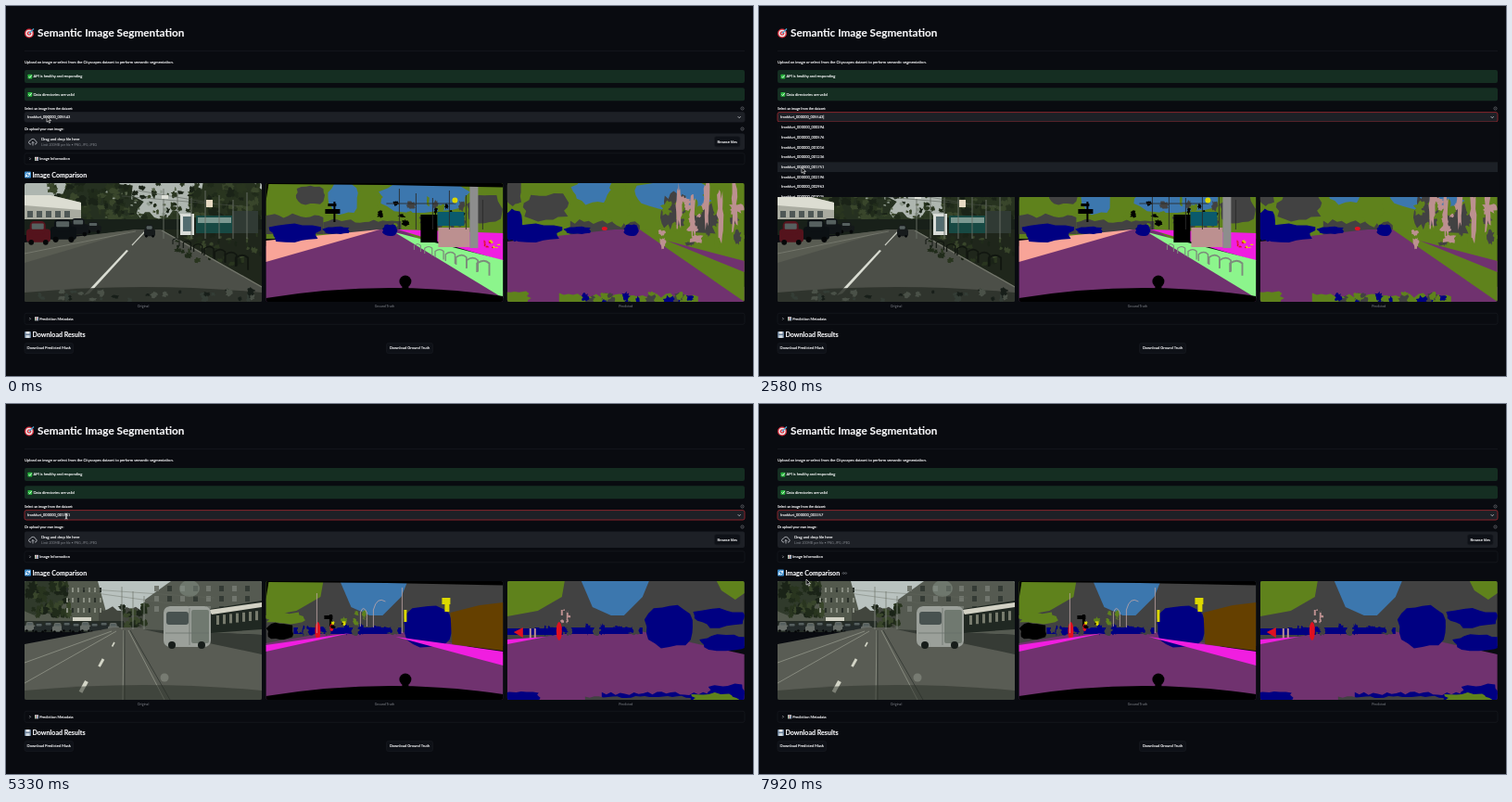
An HTML page for the animation above (8 s loop, 806x399 px).

```html
<!DOCTYPE html>
<html lang="en">
<head>
<meta charset="utf-8">
<title>Semantic Image Segmentation</title>
<style>
  html, body { margin: 0; width: 100%; height: 100%; overflow: hidden; background: #090b10; }
  svg { display: block; width: 100vw; height: 100vh; }
  text { font-family: Lato, "Open Sans", sans-serif; color: #f8f8fa; fill: currentColor;
    stroke: currentColor; stroke-width: .12; white-space: pre; }
  .dim { color: #82868d; stroke-width: 0; }
  .edge { stroke: #171a20; stroke-width: .7; }
</style>
</head>
<body>
<svg id="stage" viewBox="0 0 806 399"></svg>
<script>
const LOOP = 8000, STEP = 1000 / 12, ROW = 10.68, PANEL = 260.4;
const C = {
  road: '#70326f', veg: '#5f821c', sky: '#3c77ae', wall: '#424242', car: '#000082',
  walk: '#f01ee0', grass: '#8cf58c', park: '#f8a498', pole: '#bc9090', person: '#e01020',
  sign: '#dcd800', fence: '#654000', black: '#000', teal: '#0a5a6c', grey: '#8d8d8d'
};
const LEAVES = ['#1a2317', '#29351f', '#39462b', '#202b1a'];

// Markup helpers
const poly = (fill, points) => `<polygon fill="${fill}" points="${points}"/>`;
const rect = (fill, x, y, w, h, more = '') =>
  `<rect fill="${fill}" x="${x}" y="${y}" width="${w}" height="${h}" ${more}/>`;
const blob = (fill, x, y, rx, ry = rx, more = '') =>
  `<ellipse fill="${fill}" cx="${x}" cy="${y}" rx="${rx}" ry="${ry}" ${more}/>`;
const line = (color, width, d, more = '') =>
  `<path fill="none" stroke="${color}" stroke-width="${width}" d="${d}" ${more}/>`;
const text = (x, y, size, str, more = '') =>
  `<text x="${x}" y="${y + size * .35}" font-size="${size}" ${more}>${str}</text>`;
const group = (id, body, more = '') => `<g id="${id}" ${more}>${body}</g>`;
const repeat = (n, f) => Array.from({ length: n }, (_, i) => f(i)).join('');

function random(seed) {
  let s = (Math.abs(Math.round(seed)) * 7919 + 104729) % 2147483647;
  return () => (s = s * 16807 % 2147483647) / 2147483647;
}

// Rounded box with an uneven outline
function patch(fill, x, y, rx, ry, rough = .12) {
  const rnd = random(x * 31 + y * 17 + rx);
  return poly(fill, Array.from({ length: 20 }, (_, i) => {
    const c = Math.cos(i * Math.PI / 10), s = Math.sin(i * Math.PI / 10);
    const r = (Math.abs(c) ** 3 + Math.abs(s) ** 3) ** (-1 / 3) * (1 + rough * (rnd() * 2 - 1));
    return `${(x + rx * r * c).toFixed(1)},${(y + ry * r * s).toFixed(1)}`;
  }).join(' '));
}

// Uneven spots over a box
function scatter(n, x, y, w, h, size, colors) {
  const rnd = random(n * 53 + x + y * 7);
  return repeat(n, i => patch(colors[i % colors.length], x + rnd() * w, y + rnd() * h,
    size * (.4 + rnd()), size * (.4 + rnd()), .35));
}

// Band with a ragged upper edge
function ridge(fill, x, y, w, h, rough) {
  const rnd = random(x + y * 11 + w), n = Math.ceil(w / 5);
  return `<path fill="${fill}" d="M${x} ${y + h}${repeat(n + 1, i =>
    `L${x + w * i / n} ${(y + rough * (rnd() * 2 - 1)).toFixed(1)}`)}V${y + h}Z"/>`;
}

// Strip of ground that narrows toward the horizon
const wedge = (fill, vx, vy, x, top, bottom) => poly(fill, `${vx},${vy} ${x},${top} ${x},${bottom}`);
const ground = (fill, vx, left, right) =>
  poly(fill, `0,${left} ${vx - 14},50 ${vx + 14},50 256,${right} 256,128 0,128`);
const racks = (color, y) => repeat(7, i => {
  const s = 1 + i * .15;
  return line(color, s, `M${160 + i * 11.3} ${y + i * 4}v${-5 * s}q${4 * s} ${-3 * s} ${7 * s} 0v${7 * s}`);
});
const poles = (n, color, x, gap, h) => repeat(n, i => line(color, .9, `M${x + i * gap} ${6 + i * 5 % 13}V${h}`));

const egoMask = poly(C.black, '0,0 256,0 256,4.5 130,2 3,1 0,20') +
  `<path d="M0 124Q128 103 256 122V128H0Z"/>` + blob(C.black, 150.5, 106, 6.5) + rect(C.black, 147, 108, 7, 6);

const parkedCar = (x, y, w, h, fill) =>
  rect(fill, x, y + h * .35, w, h * .6, `rx="${h * .15}"`) +
  rect(fill, x + w * .14, y, w * .66, h * .6, `rx="${h * .2}"`) +
  rect('#56605f', x + w * .22, y + h * .1, w * .5, h * .26, 'rx="1"') +
  blob('#050708', x + w * .2, y + h * .95, w * .11) + blob('#050708', x + w * .8, y + h * .95, w * .11);
const hood = `<path fill="#2b3029" d="M0 118Q128 106 256 118V128H0Z" opacity=".85"/>`;

function avenuePhoto() {
  return rect('#aeb6b0', 0, 0, 256, 55) +
    patch('#253020', 82, 20, 40, 26, .2) + ridge('#2c3924', 95, 34, 80, 20, 5) +
    patch('#27321f', 222, 24, 40, 32, .15) +
    scatter(75, 28, 0, 82, 40, 4, LEAVES) + scatter(85, 178, 0, 78, 46, 4, LEAVES) +
    scatter(45, 105, 0, 75, 48, 2.4, LEAVES) + scatter(18, 85, 5, 90, 32, 1.5, ['#8e998d', '#56634b']) +
    poly('#a9aba0', '0,13 28,13 61,21 61,44 0,48') + poly('#dcddd2', '0,13 28,13 61,21 61,29 0,24') +
    repeat(5, i => rect('#4f5856', 3 + i * 10, 30, 6, 7)) + rect('#182019', 0, 39, 256, 17) +
    ground('#4c4f48', 133, 66, 108) + wedge('#595c52', 122, 50, 0, 64, 86) +
    wedge('#1f261b', 148, 50, 256, 50, 112) +
    scatter(40, 165, 52, 90, 35, 2.5, LEAVES) +
    line('#73766b', 1.3, 'M148 51L256 112') + line('#85887c', .6, 'M120 52L0 76') +
    poly('#d9dcd2', '110,72 112,73 70,119 64,121') + line('#c8cbc1', 1.2, 'M130 52L116 67') +
    parkedCar(66, 42, 17, 11, '#15191a') + parkedCar(48, 38, 21, 18, '#111518') +
    parkedCar(28, 39, 28, 23, '#0c1114') + parkedCar(2, 41, 26, 24, '#54131c') +
    parkedCar(129, 45, 12, 13, '#171b1c') +
    rect('#174943', 185, 35, 40, 19) + rect('#7c9991', 187, 37, 36, 6) + rect('#303a34', 224, 30, 28, 24) +
    rect('#d9dcd8', 168, 33, 15, 23) + rect('#536c70', 171, 36, 9, 16) +
    poles(7, '#6d736a', 150, 15, 60) + line('#4e544d', .5, 'M105 14L235 25M122 8L205 22') +
    rect('#dde0d8', 148, 13, 7, 4) + rect('#e6d9c2', 196, 18, 7, 8) + racks('#111610', 66) +
    hood + scatter(30, 10, 116, 236, 11, 3, ['#4a5148', '#171e19', '#343d36']);
}

const avenueCars = patch(C.car, 31, 54, 28, 9, .2) + patch(C.car, 76, 51, 14, 4) + patch(C.car, 134, 51, 8, 6);

function avenueTruth() {
  return rect(C.veg, 0, 0, 256, 60) +
    patch(C.sky, 84, 16, 16, 17) + patch(C.sky, 171, 15, 47, 16, .08) + patch(C.veg, 112, 24, 13, 22) +
    patch(C.wall, 48, 13, 15, 10) + ridge(C.wall, 0, 35, 62, 20, 3) + ridge(C.wall, 62, 41, 84, 14, 2) +
    patch(C.wall, 236, 28, 18, 15) + scatter(26, 112, 20, 108, 26, 3.5, [C.veg, C.wall, C.black]) +
    ground(C.road, 133, 68, 116) + wedge(C.park, 123, 50, 0, 62, 85) +
    wedge(C.walk, 142, 50, 256, 54, 84) + wedge(C.grass, 139, 53, 256, 83, 124) + avenueCars +
    rect(C.pole, 186, 48, 34, 21) + rect(C.teal, 185, 31, 29, 15) +
    rect(C.black, 167, 34, 18, 30) + rect(C.grey, 220, 2, 9, 68) +
    rect(C.black, 64, 28, 16, 5) + rect(C.black, 67, 22, 9, 3) + line(C.black, 2, 'M74 20V42') +
    poles(6, '#2c2c2c', 144, 18, 50) + line('#2c2c2c', .9, 'M130 22H205') +
    blob(C.sign, 204, 18.5, 3) + scatter(12, 228, 58, 26, 12, 1.2, [C.person, C.sign]) +
    racks('#7c8b7b', 72) + egoMask;
}

function avenueResult() {
  return rect(C.veg, 0, 0, 256, 60) +
    patch(C.wall, 6, 10, 9, 14, .2) + patch(C.wall, 42, 26, 24, 14, .2) + ridge(C.wall, 68, 42, 75, 14, 4) +
    patch(C.sky, 92, 9, 22, 14, .2) + patch(C.sky, 175, 13, 40, 16, .2) + patch(C.veg, 118, 24, 13, 20, .25) +
    patch(C.wall, 176, 30, 9, 18, .3) + patch(C.wall, 213, 46, 10, 24, .3) +
    ground(C.road, 130, 63, 112) + patch(C.car, 8, 45, 9, 17) + avenueCars +
    wedge(C.veg, 143, 50, 256, 56, 128) + wedge(C.road, 172, 62, 256, 84, 96) +
    scatter(28, 160, 18, 90, 50, 5, [C.pole, C.veg, C.wall]) +
    repeat(5, i => patch(C.pole, 185 + i * 15, 24 + i % 2 * 10, 3, 24, .4)) +
    blob(C.person, 105, 49, 3, 2) + patch(C.veg, 8, 124, 16, 7, .2) + ridge(C.veg, 56, 121, 150, 7, 3) +
    scatter(24, 50, 121, 155, 7, 4, [C.wall, C.car, C.veg]);
}

function streetPhoto() {
  return rect('#b9c2bf', 0, 0, 256, 54) +
    poly('#53594d', '0,0 79,0 92,48 0,52') + patch('#303a2b', 20, 14, 26, 20, .2) +
    ridge('#42463e', 80, 30, 50, 24, 4) + poly('#555a51', '126,53 130,20 158,0 256,0 256,58') +
    scatter(48, 0, 0, 50, 38, 4, LEAVES) + scatter(24, 105, 25, 25, 24, 3, LEAVES) +
    repeat(21, i => rect(i % 3 ? '#8a8f83' : '#292f29', 45 + (i % 7) * 6, 7 + Math.floor(i / 7) * 11, 2, 5)) +
    repeat(24, i => rect(i % 2 ? '#343b35' : '#71766e', 140 + (i % 8) * 14, 5 + Math.floor(i / 8) * 11, 5, 6)) +
    rect('#252c26', 0, 43, 107, 12) + rect('#d2d2c5', 52, 39, 20, 4) +
    repeat(10, i => parkedCar(i * 10, 44 + i % 2, 12, 10, i % 3 ? '#242b2b' : '#686e69')) +
    ground('#595c54', 110, 68, 77) + wedge('#363b35', 128, 52, 256, 58, 79) +
    line('#92968a', .8, 'M107 53L106 128M112 53L151 128M99 54L0 110M94 54L0 88') +
    line('#383d37', 1, 'M108 53L108 128M114 53L157 128') +
    repeat(3, i => {
      const s = 1 + i * .8;
      return line('#d3d5c7', 1.6 * s, `M${97 - i * 9 - i * i * 3} ${66 + i * 15 + i * i * 3}l${-2.5 * s} ${4.5 * s}`);
    }) +
    poly('#202822', '200,30 256,21 256,52 201,56') + poly('#d2d1c4', '199,31 256,23 256,28 202,36') +
    repeat(7, i => rect('#777b6d', 207 + i * 7, 37 - i * .8, 3, 10)) +
    rect('#9ba09a', 150, 27, 51, 44, 'rx="7"') + rect('#485250', 153, 33, 24, 14, 'rx="3"') +
    rect('#707970', 180, 31, 19, 36, 'rx="2"') + line('#656e68', .7, 'M178 29V69M152 56H199') +
    blob('#171d1a', 159, 69, 4) + blob('#171d1a', 191, 69, 4) +
    blob('#8d998f', 178, 8, 11, 9, 'opacity=".45"') +
    poles(3, '#81867d', 105, 12, 52) + line('#62675f', .4, 'M70 12L178 27M58 8L205 18') +
    `<g opacity=".6">${hood}</g>` + blob('#777b72', 151, 104, 4.5);
}

function streetLabels(rough) {
  return rect(C.wall, 0, 0, 256, 70) + poly(C.veg, '0,0 62,0 59,17 33,32 0,38') +
    poly(C.sky, '80,0 153,0 146,17 126,37 112,37 92,28') +
    ground(C.road, 112, 67, 79) + rect(C.car, 30, 50, 116, 7) + scatter(18, 31, 50, 114, 5, 4, [C.car, C.car, C.wall]) +
    patch(C.car, 175, 49, 26, 22, rough) + blob(C.person, 56, 54, 3, 10);
}

function streetTruth() {
  return streetLabels(.04) + patch(C.veg, 20, 40, 20, 6, .2) +
    scatter(12, 73, 34, 43, 12, 3, [C.wall, C.veg]) + patch(C.black, 15, 54, 14, 9) +
    wedge(C.walk, 91, 56, 0, 69, 76) + wedge(C.walk, 140, 60, 256, 76, 91) +
    poly(C.fence, '199,34 231,26 256,23 256,75 201,68') +
    rect(C.sign, 190, 18, 9, 7) + rect(C.sign, 193, 25, 5, 8) + rect(C.sign, 149, 31, 3, 13) +
    line('#c2a8a8', .8, 'M55 13V56M147 7V56M102 49V34Q105 25 109 34V49M116 50V31Q120 16 129 22') +
    rect(C.black, 63, 37, 9, 4) + line(C.black, 3, 'M70 36V49') + blob(C.person, 71, 50, 2, 4) +
    scatter(8, 62, 38, 23, 12, 1.5, [C.black, C.sign, C.wall]) + egoMask;
}

function streetResult() {
  return streetLabels(.08) + poly(C.veg, '226,0 256,0 256,13 246,20 231,10') +
    rect(C.car, 0, 51, 60, 7) + patch(C.car, 229, 40, 26, 9, .25) + patch(C.car, 236, 66, 26, 8, .2) +
    blob(C.person, 56, 54, 3, 9) + wedge(C.person, 7, 55, 17, 50, 61) +
    line(C.pole, 2, 'M25 51V63M30 51V61M59 31V37M65 32V44') + scatter(7, 57, 30, 12, 14, 1.5, [C.pole, C.wall]) +
    wedge(C.walk, 42, 60, 0, 63, 68) + patch(C.car, 15, 124, 19, 5, .2) +
    ridge(C.car, 102, 121, 154, 7, 2) + patch(C.car, 238, 120, 20, 8, .2) +
    ridge(C.wall, 84, 125, 114, 3, 1.5) + patch(C.veg, 224, 126, 24, 5, .2);
}

// Small pictographs
const chart = (x, y) => rect('#d7dde0', x, y - 2, 4, 4) +
  ['#44a35c', '#d14848', '#397ebd'].map((c, i) => rect(c, x + .5 + i * 1.1, y - i % 2 - .5, .8, 2 + i % 2)).join('');
const tick = y => rect('#26b43b', 23.5, y - 2.3, 4.7, 4.7, 'rx=".6"') +
  line('#fff', .8, `M24.5 ${y}l1.2 1.3 2 -2.7`);
const target = repeat(4, i => blob(i % 2 ? '#eee' : '#d8303e', 25, 29.5, 5 - i * 1.35)) +
  line('#4aa4cf', 1.2, 'M25 29.5L30 24.5');
const refresh = rect('#3989c9', 20, 178.5, 7, 7, 'rx="1"') +
  line('#fff', .9, 'M21.4 181.5q2 -2.6 4.2 -.3m0 -1.5v1.6h-1.6M25.6 182.6q-2 2.6 -4.2 .3m0 1.5v-1.6h1.6');
const floppy = rect('#657a92', 20, 351, 7, 7, 'rx=".7"') + rect('#e3e7ea', 21.5, 351, 4, 2.6) +
  rect('#cfd9e0', 21.4, 355, 4.2, 3);
const help = y => `<circle cx="794.5" cy="${y}" r="1.6" fill="none" stroke="#92959d" stroke-width=".5"/>` +
  text(794.5, y, 2.4, '?', 'text-anchor="middle" class="dim"');

// Page parts
const bar = (fill, y, h, more = '') => rect(fill, 20, y, 777, h, 'rx="2" ' + more);
const expander = (y, label) => bar('none', y - 6, 12, 'class="edge"') +
  line('#d9dbe0', .6, `M25.3 ${y - 1.2}l1.2 1.2 -1.2 1.2`) + chart(31, y) + text(36.2, y, 4.08, label);
const button = (x, y, w, label) => rect('#0e1117', x, y - 5.5, w, 11, 'rx="2" class="edge"') +
  text(x + w / 2, y, 4.1, label, 'text-anchor="middle"');
const success = (y, label) => bar('#152e22', y - 7, 14) + tick(y) + text(29.5, y, 4.08, label);
const heading = (y, label) => text(28.5, y, 7.1, label, 'font-weight="700"');
const panels = (id, views) => group(id, views.map((draw, i) =>
  `<g transform="translate(${20 + i * PANEL} 191)" clip-path="url(#frame)">${draw()}</g>`).join(''));
const frames = '294 576 1016 1236 1751 2196 2963 3025 3357 3920 4617 5543'.split(' ')
  .map(n => 'frankfurt_000000_' + n.padStart(6, '0'));

const stage = document.getElementById('stage');
stage.innerHTML = `<defs><clipPath id="frame"><rect width="256" height="128" rx="2"/></clipPath>
  <clipPath id="menuClip"><rect x="19" y="125" width="779" height="81"/></clipPath></defs>` +
  rect('#090b10', 0, 0, 806, 399) + target +
  text(34, 29, 11.75, 'Semantic Image Segmentation', 'font-weight="700"') + line('#171a20', .7, 'M20 48.5H797') +
  text(20, 61, 4.08, 'Upload an image or select from the Cityscapes dataset to perform semantic segmentation.') +
  success(76, 'API is healthy and responding') + success(95.3, 'Data directories are valid') +
  text(20, 110.3, 3.58, 'Select an image from the dataset:') + help(110.5) +
  text(20, 132.5, 3.58, 'Or upload your own image:') + help(132.5) + bar('#1d2026', 137.5, 17.5) +
  line('#c3c6cc', .8, 'M27 149h-1a2 2 0 0 1 .5 -3.9a2.7 2.7 0 0 1 5.2 .3a1.9 1.9 0 0 1 .3 3.6h-1M29 150.5v-4m-1.4 1.4l1.4 -1.4 1.4 1.4') +
  text(38, 143.2, 4.1, 'Drag and drop file here') +
  text(38, 149.5, 3.5, 'Limit 200MB per file • PNG, JPG, JPEG', 'class="dim"') +
  button(764.5, 146.3, 27.5, 'Browse files') + expander(164.8, 'Image Information') +
  group('busy', line('#b6b9bf', .6, 'M22.6 176.2a1.6 1.6 0 0 1 0 3') +
    text(27, 177.8, 4.08, 'Performing Segmentation...') + line('#d9dbe0', .8, 'M785 0l1.5 1.5M797 .5h3')) +
  group('results', refresh + heading(182.2, 'Image Comparison') +
    group('anchor', repeat(2, i => blob('none', 91.2 + i * 2.4, 182.5, 1.1, .8, 'stroke="#8d9097" stroke-width=".5"'))) +
    panels('avenue', [avenuePhoto, avenueTruth, avenueResult]) +
    panels('street', [streetPhoto, streetTruth, streetResult]) +
    ['Original', 'Ground Truth', 'Predicted'].map((s, i) =>
      text(148 + i * PANEL, 324, 3.65, s, 'text-anchor="middle" class="dim"')).join('') +
    expander(337.3, 'Prediction Metadata') + floppy + heading(354.5, 'Download Results') +
    button(20, 369, 52.5, 'Download Predicted Mask') + button(410.5, 369, 50, 'Download Ground Truth')) +
  bar('#1d2026', 114.6, 10.4, 'id="field" stroke-width=".8"') +
  text(23, 119.8, 3.93, '', 'id="value"') + line('#fff', .5, 'M69.7 117.5v4.7', 'id="caret"') +
  line('#d9dbe0', .8, 'M789.7 119.2l1.5 1.5 1.5 -1.5') +
  group('menu', rect('#0a0c11', 19, 125, 779, 81) + rect('#1c2026', 20, 0, 777, ROW, 'id="hover"') +
    group('rows', frames.map((name, i) => text(24, 131 + i * ROW, 3.93, name)).join('')) +
    rect('#5b5e65', 794, 126, 1.8, 5, 'rx=".9" id="thumb"'), 'clip-path="url(#menuClip)"') +
  group('pointer', '<path id="arrow" d="M0 0v6.2l1.5 -1.3 1.1 2.3 1 -.5 -1.1 -2.2h2Z" fill="#08090b" stroke="#fff" stroke-width=".6"/>' +
    line('#fff', .7, 'M-1.4 -3q1.4 0 1.4 1v4q0 1 -1.4 1M1.4 -3q-1.4 0 -1.4 1v4q0 1 1.4 1', 'id="beam"'));

const el = Object.fromEntries([...stage.querySelectorAll('[id]')].map(e => [e.id, e]));
const show = (e, on) => e.setAttribute('visibility', on ? 'visible' : 'hidden');
const shift = (e, x, y) => e.setAttribute('transform', `translate(${x} ${y})`);
const within = (t, a, b) => t >= a && t < b;
const ramp = (t, a, b) => {
  const u = Math.min(1, Math.max(0, (t - a) / (b - a)));
  return u * u * (3 - 2 * u);
};

// Moments of the session, in ms
const OPEN = 1150, PICK = 2660, RUN = 2900, DONE = 3660, REOPEN = 5660, REPICK = 7160;
const spots = [
  { x: 44, y: 119 },
  { x: 38, y: 120.5, from: 500, to: 1000 },
  { x: 46, y: 174, from: 1750, to: 2500 },
  { x: 65, y: 121, from: 4500, to: 5200 },
  { x: 56, y: 189, from: 5750, to: 6400 },
  { x: 51, y: 189, from: 7200, to: 7750 }
];
const pointerAt = t => spots.reduce((p, s) => {
  const u = ramp(t, s.from, s.to);
  return { x: p.x + (s.x - p.x) * u, y: p.y + (s.y - p.y) * u };
});

function render(t) {
  const { x, y } = pointerAt(t), scroll = 23.8 * ramp(t, 6250, 6670);
  const open = within(t, OPEN, PICK) || within(t, REOPEN, REPICK);
  const busy = within(t, RUN, DONE), beam = y < 125 && t > 400;

  shift(el.pointer, x, y);
  show(el.beam, beam);
  show(el.arrow, !beam);

  el.value.textContent = frames[t < PICK ? 11 : t < REPICK ? 4 : 8];
  el.field.setAttribute('stroke', t < OPEN ? '#1d2026' : '#a3272f');
  show(el.caret, (open || within(t, DONE, 5000)) && (t + 170) % 1000 < 780);

  show(el.busy, busy);
  shift(el.results, 0, busy ? 11 : 0);
  show(el.avenue, t < DONE);
  show(el.street, t >= DONE);
  show(el.anchor, t >= 7500);

  // The hovered row stays put while the list scrolls beneath the pointer
  const row = within(t, 6250, 6850) ? 5 : Math.round((y + 1 + scroll - 131) / ROW);
  show(el.menu, open);
  shift(el.rows, 0, -scroll);
  show(el.thumb, open && scroll > 0);
  el.hover.setAttribute('y', 131 - ROW / 2 + row * ROW - scroll);
  show(el.hover, open && row >= 0);
}

const start = performance.now();
function play() {
  const t = (performance.now() - start) % LOOP;
  render(Math.floor(t / STEP) * STEP);
  requestAnimationFrame(play);
}
play();
</script>
</body>
</html>
```
